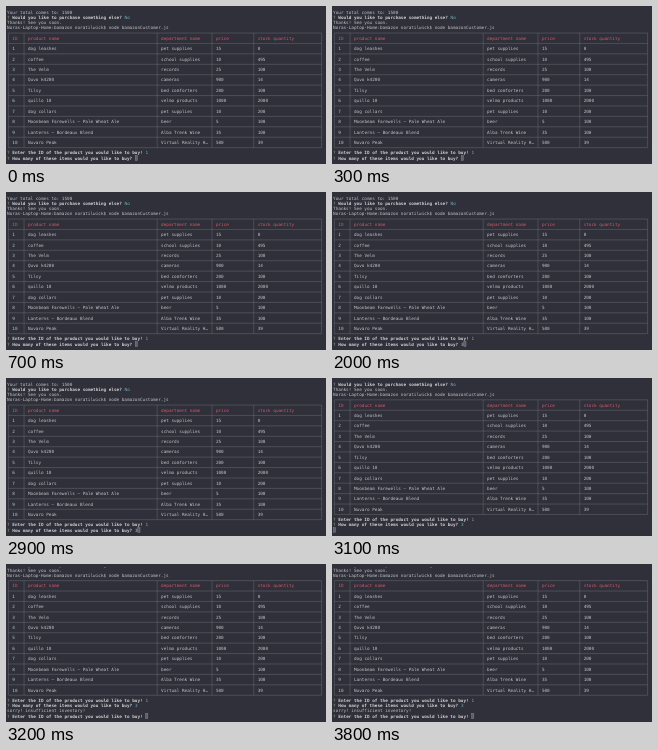
An HTML page that plays this animation: 320 by 158 pixels, repeating every 4.5 s.

```html
<!DOCTYPE html>
<html lang="en">
<head>
<meta charset="utf-8">
<title>Terminal shop</title>
<style>
  html, body { margin: 0; width: 100%; height: 100%; overflow: hidden; background: #2f3039; }
  svg { display: block; width: 100%; height: 100%; }
  text {
    font: 4.335px "DejaVu Sans Mono", "Liberation Mono", monospace;
    fill: #c3c4c8;
    text-rendering: geometricPrecision;
  }
  .bold { font-weight: bold; fill: #d0d1d4; }
  .mark { fill: #93b587; }
  .answer { fill: #6fb0c0; }
  .head { fill: #d4596c; }
  .grid { fill: none; stroke: #75767d; stroke-width: .42; }
  .cursor { fill: #5d5f68; stroke: #94969d; stroke-width: .4; }
</style>
</head>
<body>
<svg viewBox="0 0 320 158">
  <clipPath id="view"><rect y="3.6" width="320" height="155"/></clipPath>
  <g clip-path="url(#view)"><g id="screen"></g></g>
</svg>
<script>
const LOOP = 4500, TYPED = 2000, ENTER = 3100, REPLY = 3200;
const LEFT = 1.1, TOP = 3.6, CW = 2.61, LH = 5.21, BASE = 4.15;
const screen = document.getElementById('screen');

const colX = c => LEFT + c * CW;
const rowY = r => TOP + r * LH;

function add(tag, attrs, content = '') {
  const el = document.createElementNS('http://www.w3.org/2000/svg', tag);
  for (const key in attrs) el.setAttribute(key, attrs[key]);
  el.textContent = content;
  return screen.appendChild(el);
}

function print(row, col, str, cls = '') {
  return add('text', { x: colX(col), y: rowY(row) + BASE, class: cls }, str);
}

function ask(row, question) {
  return [print(row, 0, '?', 'mark'), print(row, 2, question, 'bold')];
}

// Table: column widths in characters, borders take one each
const widths = [5, 50, 20, 15, 25];
const borders = [0];
widths.forEach((w, i) => borders.push(borders[i] + w + 1));

const rows = [
  ['ID', 'product name', 'department name', 'price', 'stock quantity'],
  [1, 'dog leashes', 'pet supplies', 15, 0],
  [2, 'coffee', 'school supplies', 10, 495],
  [3, 'The Velm', 'records', 25, 100],
  [4, 'Quvo k4200', 'cameras', 900, 14],
  [5, 'Tilsy', 'bed comforters', 200, 100],
  [6, 'quillo 10', 'velmo products', 1000, 2000],
  [7, 'dog collars', 'pet supplies', 10, 200],
  [8, 'Moonbeam Farewells – Pale Wheat Ale', 'beer', 5, 100],
  [9, 'Lanterns – Bordeaux Blend', 'Alba Trenk Wine', 35, 100],
  [10, 'Nuvaro Peak', 'Virtual Reality Headsets', 500, 39]
];

function drawTable(first) {
  const last = first + rows.length * 2;
  const midX = c => colX(c + .5), midY = r => rowY(r + .5);
  let d = '';
  for (const b of borders) d += `M${midX(b)} ${midY(first)}V${midY(last)}`;
  for (let r = first; r <= last; r += 2) d += `M${midX(0)} ${midY(r)}H${midX(borders.at(-1))}`;
  add('path', { d, class: 'grid' });

  rows.forEach((cells, i) => cells.forEach((cell, j) => {
    const str = String(cell), room = widths[j] - 2;
    const shown = str.length > room ? str.slice(0, room - 1) + '…' : str;
    print(first + 1 + i * 2, borders[j] + 2, shown, i ? '' : 'head');
  }));
}

print(0, 0, 'Your total comes to: 1500');
ask(1, 'Would you like to purchase something else?');
print(1, 45, 'No', 'answer');
print(2, 0, 'Thanks! See you soon.');
print(3, 0, 'Noras-Laptop-Home:bamazon noratilwick$ node bamazonCustomer.js');
drawTable(4);

const askId = 'Enter the ID of the product you would like to buy!';
ask(27, askId);
print(27, 53, '1', 'answer');
ask(28, 'How many of these items would you like to buy?');
const amount = print(28, 49, '3');
const reply = [print(29, 0, 'sorry! insufficient inventory!'), ...ask(30, askId)];
const cursor = add('rect', { width: CW - .4, height: LH - .4, class: 'cursor' });

function show(el, on) {
  el.setAttribute('visibility', on ? 'visible' : 'hidden');
}

function render(t) {
  const entered = t >= ENTER, replied = t >= REPLY;
  const scroll = replied ? 2 : entered ? 1 : 0;
  const col = replied ? 53 : entered ? 0 : t >= TYPED ? 50 : 49;
  screen.setAttribute('transform', `translate(0 ${-scroll * LH})`);
  show(amount, t >= TYPED);
  amount.setAttribute('class', entered ? 'answer' : '');
  reply.forEach(el => show(el, replied));
  cursor.setAttribute('x', colX(col) + .2);
  cursor.setAttribute('y', rowY(28 + scroll) + .2);
}

const start = performance.now();
function tick() {
  render((performance.now() - start) % LOOP);
  requestAnimationFrame(tick);
}
tick();
</script>
</body>
</html>
```
